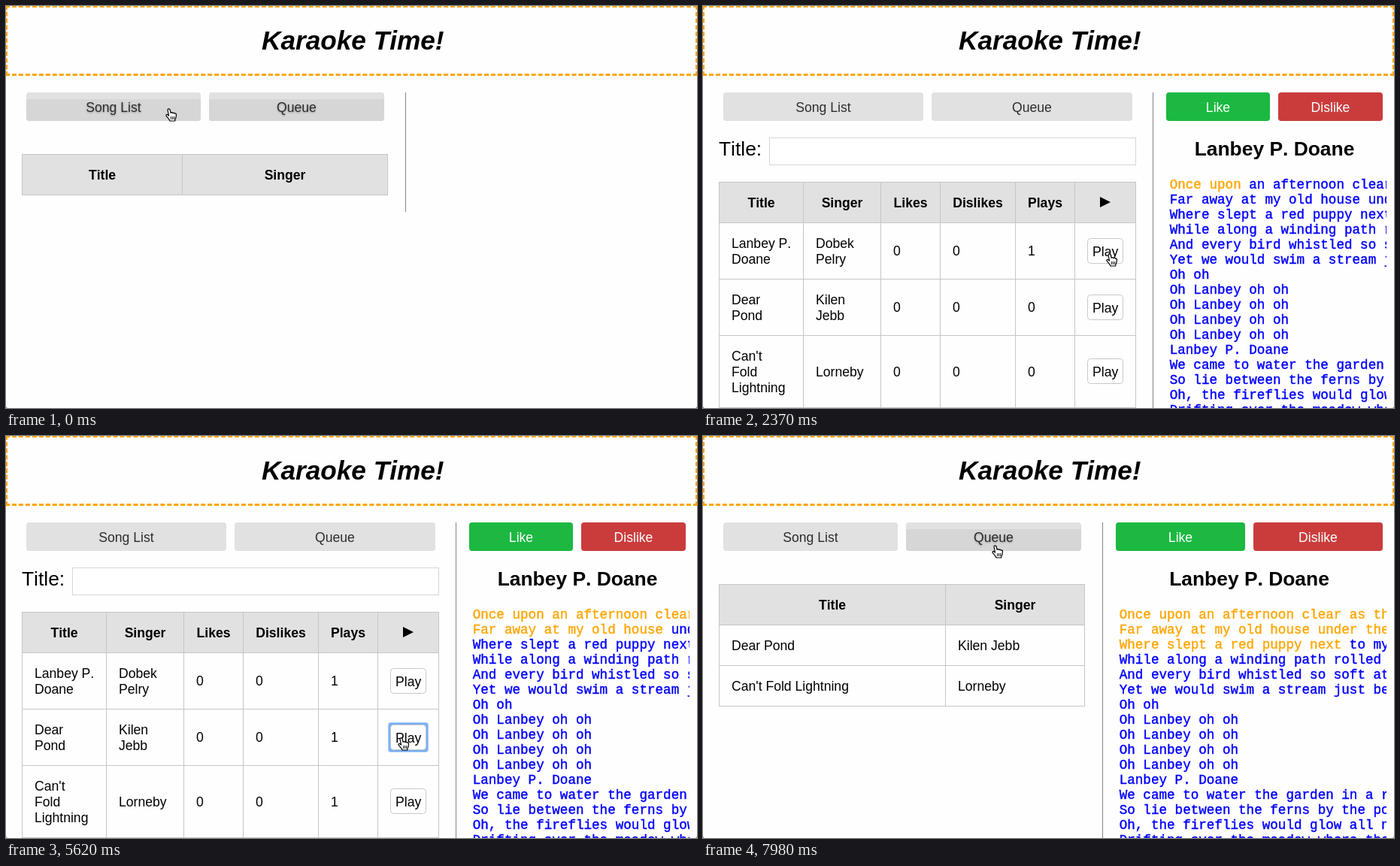
Animation, 919 px wide and 535 px high, one loop 8000 ms. Source, as an HTML page:

```html
<!DOCTYPE html>
<html lang="en">
<head>
<meta charset="utf-8">
<title>Karaoke Time!</title>
<style>
html, body { margin: 0; width: 100%; height: 100%; overflow: hidden; background: #fefefe; }
header { position: absolute; left: -1px; top: -1px; width: 921px; height: 94px; box-sizing: border-box; border: 3px dashed orange; }
svg { position: absolute; left: 0; top: 0; }
text { font: 17.6px "Liberation Sans", Helvetica, Arial, sans-serif; font-kerning: none; white-space: pre; }
.b { font-weight: bold; }
.m { text-anchor: middle; }
.big { font-size: 26.4px; }
.top { font-size: 35.2px; font-weight: bold; font-style: italic; }
.lyric { font: 17.6px "Liberation Mono", "Courier New", monospace; fill: #00f; stroke: #00f; stroke-width: .4px; }
.sung { fill: orange; stroke: orange; }
.soft { filter: drop-shadow(0 1px 1px rgba(0, 0, 0, .3)); }
</style>
</head>
<body>
<header></header>
<svg id="stage" width="919" height="535" viewBox="0 0 919 535">
  <clipPath id="pane"><rect x="540" y="225" width="369" height="310"/></clipPath>
</svg>
<script>
const stage = document.getElementById('stage');
const GREY = '#e1e1e1', LINE = '#c6c6c6';

const songs = [
  { title: ['Lanbey P.', 'Doane'], singer: ['Dobek', 'Pelry'] },
  { title: ['Dear', 'Pond'], singer: ['Kilen', 'Jebb'] },
  { title: ["Can't", 'Fold', 'Lightning'], singer: ['Lorneby'] }
];
const hook = 'Oh Lanbey oh oh';
const lyrics = [
  'Once upon an afternoon clear as the river',
  'Far away at my old house under the oaks',
  'Where slept a red puppy next to my chair',
  'While along a winding path rolled carts',
  'And every bird whistled so soft at noon',
  'Yet we would swim a stream just before',
  'Oh oh', hook, hook, hook, hook, songs[0].title.join(' '),
  'We came to water the garden in a row of',
  'So lie between the ferns by the ponds',
  'Oh, the fireflies would glow all night',
  'Drifting over the meadow where the wind'
];

// pointer stops; a stop with a row presses that row's Play button
const stops = [
  { n: -2, x: 220, y: 145 },
  { n: -1, x: 211, y: 145 },
  { n: 5, x: 533, y: 320 },
  { n: 7, x: 537, y: 328, row: 0 },
  { n: 11, x: 544, y: 338 },
  { n: 16, x: 538, y: 410, row: 1 },
  { n: 21, x: 540, y: 497, row: 2 },
  { n: 28, x: 532, y: 345, row: 0 },
  { n: 33, x: 529, y: 410, row: 1 },
  { n: 38, x: 526, y: 487, row: 2 },
  { n: 44, x: 392, y: 154 }
];

function add(parent, tag, attrs = {}, label) {
  const el = document.createElementNS('http://www.w3.org/2000/svg', tag);
  for (const key in attrs) el.setAttribute(key, attrs[key]);
  if (label !== undefined) el.textContent = label;
  parent.appendChild(el);
  return el;
}
const group = (parent = stage) => add(parent, 'g');
const box = (p, x, y, width, height, fill, more) => add(p, 'rect', { x, y, width, height, fill, ...more });
const write = (p, x, y, label, cls = '', fill = '#000') => add(p, 'text', { x, y, class: cls, fill }, label);
const show = (el, on) => el.setAttribute('display', on ? 'inline' : 'none');

function button(p, x, w, label, fill = GREY, ink = '#2d2d2d') {
  box(p, x, 115, w, 38, fill, { rx: 4 });
  const shade = add(p, 'path', { fill: '#d6d6d6', d: `M${x} 124h${w}v25q0 4-4 4h${8 - w}q-4 0-4-4z` });
  const text = write(p, x + w / 2, 141, label, 'm', ink);
  const hover = on => { show(shade, on); text.classList.toggle('soft', on); };
  hover(false);
  return hover;
}

function table(p, xs, ys, heads) {
  const [x, y] = [xs[0], ys[0]], right = xs[xs.length - 1], end = ys[ys.length - 1];
  box(p, x, y, right - x, ys[1] - y, GREY);
  xs.forEach(v => box(p, v, y, 1, end - y + 1, LINE));
  ys.forEach(v => box(p, x, v, right - x + 1, 1, LINE));
  heads.forEach((h, i) => write(p, (xs[i] + xs[i + 1] + 1) / 2, y + 34, h, 'b m'));
}

const lines = [];
function player(p, x, w) {
  const g = group(p), next = x + w + 11;
  button(g, x, w, 'Like', '#1cb841', '#fff');
  button(g, next, 904 - next, 'Dislike', '#ca3c3c', '#fff');
  write(g, (x + 904) / 2, 199, songs[0].title.join(' '), 'b m big');
  const pane = add(g, 'g', { 'clip-path': 'url(#pane)' });
  lyrics.forEach((line, i) => {
    const t = add(pane, 'text', { x: x + 4.7, y: 243 + 20 * i, class: 'lyric' });
    const sung = add(t, 'tspan', { class: 'sung' }), rest = add(t, 'tspan');
    lines.push({ i, words: line.split(' '), sung, rest });
  });
  return g;
}

function queueView(split, rows, ruleEnd) {
  const g = group();
  const list = button(g, 27, 232, 'Song List'), queue = button(g, 270, 233, 'Queue');
  const ys = [197, 251, ...rows.map((r, i) => 305 + 54 * i)];
  table(g, [21, split, 507], ys, ['Title', 'Singer']);
  rows.forEach((s, i) => {
    write(g, 38, ys[i + 1] + 34, s.title.join(' '));
    write(g, split + 17, ys[i + 1] + 34, s.singer.join(' '));
  });
  box(g, 531, 115, 1, ruleEnd - 115, '#858585');
  return { g, list, queue };
}

function songRow(g, { title, singer }, mid) {
  const stack = (x, parts) => parts.forEach((part, i) =>
    write(g, x, mid + 6.5 + 21 * (i - (parts.length - 1) / 2), part));
  stack(38, title);
  stack(150, singer);
  const [, , plays] = [253, 332, 432].map(x => write(g, x, Math.round(mid + 6), '0'));
  const top = Math.floor(mid - 17), ring = group(g);
  box(ring, 508, top - 3, 54, 40, '#a9ccfb', { rx: 4 });
  box(ring, 509, top - 2, 52, 38, '#79aff5', { rx: 3 });
  box(g, 511.5, top + .5, 47, 33, '#fff', { rx: 4, stroke: '#c8c8c8' });
  write(g, 518, top + 24, 'Play');
  return { plays, ring };
}

function songView() {
  const g = group();
  const list = button(g, 27, 266, 'Song List'), queue = button(g, 304, 267, 'Queue');
  write(g, 21, 199, 'Title:', 'big');
  box(g, 88.5, 175.5, 487, 36, '#fff', { stroke: '#d6d6d6' });
  const ys = [234, 288];
  songs.forEach((s, i) => ys.push(ys[i + 1] + 33 + 21 * s.title.length));
  table(g, [21, 133, 236, 315, 415, 494, 575], ys, ['Title', 'Singer', 'Likes', 'Dislikes', 'Plays']);
  add(g, 'path', { d: 'M528 254l14 7-14 7z' });
  const rows = songs.map((s, i) => songRow(g, s, (ys[i + 1] + ys[i + 2] + 1) / 2));
  box(g, 598, 115, 1, 420, '#858585');
  return { g, list, queue, rows, player: player(g, 616, 138) };
}

write(stage, 461.3, 58, 'Karaoke Time!', 'top m');
const empty = queueView(234, [], 274);
const main = songView();
const filled = queueView(322, songs.slice(1), 535);
player(filled.g, 549, 172);
add(stage, 'path', { d: 'M0 533v2h2zM919 533v2h-2z', fill: '#999' });

const hand = group();
add(hand, 'path', {
  fill: '#fff', stroke: '#000', 'stroke-width': 1.2, 'stroke-linejoin': 'round',
  d: 'M3.5 2.2C3.5.6 6.2.4 6.6 2L7.6 6.4C8 5.4 9.8 5.4 10.2 6.6 10.8 5.8 12.4 6 12.7 7.2 13.6 6.6 15 7.2 15 8.6 15 12 14 13.6 13.4 15L13.2 17H6.6C6 15 3.4 12.6 1.8 10.4.6 8.8 2.4 7.8 3.6 8.8L5 10z'
});
add(hand, 'path', { d: 'M8 11v4M10 11v4M12 11v4', stroke: '#000', 'stroke-width': .9 });
empty.list(true);
empty.queue(true);
filled.queue(true);

function pointer(n) {
  const b = stops.find(s => s.n >= n) || stops[stops.length - 1];
  const a = stops[Math.max(0, stops.indexOf(b) - 1)];
  const f = Math.min(1, (n - a.n) / (b.n - a.n || 1)), ease = f * f * (3 - 2 * f);
  return ['x', 'y'].map(k => Math.round(a[k] + (b[k] - a[k]) * ease));
}

// words are sung at an even pace, each line starting 16.2 steps after the one before
const wordsSung = (n, line) => Math.max(0, 1 + Math.floor((n - 8.75 - 16.2 * line) / 1.5));

function draw(n) {
  show(empty.g, n < 0);
  show(main.g, n >= 0 && n < 45);
  show(filled.g, n >= 45);
  show(main.player, n >= 8);
  main.list(n < 7);
  main.queue(n >= 43);
  main.rows.forEach(({ plays, ring }, i) => {
    const presses = stops.filter(s => s.row === i);
    plays.textContent = n > presses[0].n ? '1' : '0';
    show(ring, presses.some(s => n === s.n || n === s.n - 1));
  });
  for (const { i, words, sung, rest } of lines) {
    const count = wordsSung(n, i);
    sung.textContent = words.slice(0, count).join(' ');
    rest.textContent = (count ? ' ' : '') + words.slice(count).join(' ');
  }
  const [x, y] = pointer(n);
  hand.setAttribute('transform', `translate(${x - 8.5} ${y - 9})`);
}

// the screen advances in steps of 147.5 ms from 750 ms on
const stepAt = t => t < 150 ? -2 : t < 750 ? -1 : Math.floor((t - 742) / 147.5);
const start = performance.now();
let last = null;
function tick() {
  const n = stepAt((performance.now() - start) % 8000);
  if (n !== last) draw(last = n);
  requestAnimationFrame(tick);
}
tick();
</script>
</body>
</html>
```
